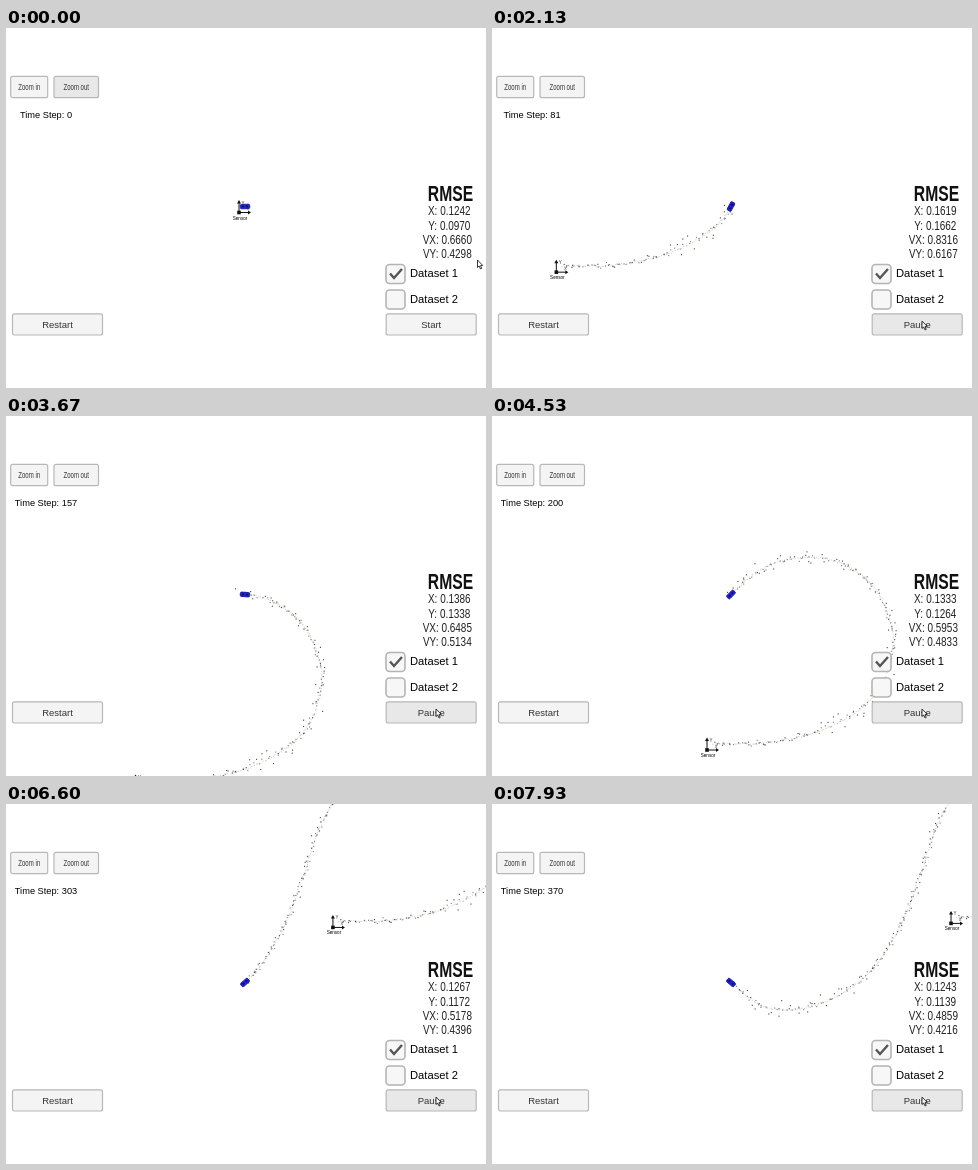
Write an HTML page with a canvas that moves like this. It is 480 px wide and 360 px high and loops after 8 s.

```html
<!DOCTYPE html>
<html>
<head>
<meta charset="utf-8">
<style>
  html, body { margin: 0; width: 100%; height: 100%; overflow: hidden; background: #fff; }
  canvas { display: block; }
</style>
</head>
<body>
<canvas id="stage" width="480" height="360"></canvas>
<script>
const ctx = document.getElementById('stage').getContext('2d');
const LOOP = 8000, FRAME = 1000 / 15, START = 520, STEPS_PER_MS = .0499;
const CAR = [239, 178.5];

// Car position relative to the sensor, one point every 25 time steps
const SPACING = 25;
const ROUTE = [
  [6, -6], [63.5, -8], [121, -22.5], [167.5, -54.5], [186, -107], [169, -160],
  [124.5, -190], [69, -187.3], [24, -155.5], [-10, -107], [-30, -51], [-50.5, 2.5],
  [-83, 50.5], [-130, 80], [-183.5, 84.5], [-229, 52]
];

// Each error settles towards a floor as a power of the step count
const ERRORS = [
  { name: 'X', idle: .1242, floor: .1138, gain: 3.894, power: 1 },
  { name: 'Y', idle: .0970, floor: .0993, gain: 5.417, power: 1 },
  { name: 'VX', idle: .6660, floor: .1819, gain: 5.847, power: .5 },
  { name: 'VY', idle: .4298, floor: .25, gain: 3.3, power: .5 }
];

// Catmull-Rom curve through the route
function position(step) {
  const last = ROUTE.length - 1;
  const i = Math.min(last - 1, Math.floor(step / SPACING)), u = step / SPACING - i;
  return [0, 1].map(k => {
    const b = ROUTE[i][k], c = ROUTE[i + 1][k];
    const a = i > 0 ? ROUTE[i - 1][k] : 2 * b - c;
    const d = i + 2 <= last ? ROUTE[i + 2][k] : 2 * c - b;
    return b + u / 2 * (c - a + u * (2 * a - 5 * b + 4 * c - d + u * (3 * (b - c) + d - a)));
  });
}

let seed = 7;
function random() {
  seed = (seed * 16807) % 2147483647;
  return seed / 2147483647;
}
const gauss = () => (random() + random() + random() + random() - 2) * 1.73;

// Alternating lidar (even noise) and radar (range and bearing noise) readings
const readings = Array.from({ length: 376 }, (_, n) => {
  const [x, y] = position(n);
  const estimate = [x + gauss() * .4, y + gauss() * .4];
  if (n % 2) return { color: '#857a74', estimate, at: [x + gauss() * 1.2, y + gauss() * 1.2] };
  const range = Math.hypot(x, y) + gauss() * 2.4, angle = Math.atan2(y, x) + gauss() * .026;
  return { color: '#40404c', estimate, at: [range * Math.cos(angle), range * Math.sin(angle)] };
});

function label(str, x, y, size, { align = 'center', color = '#333', weight = '', condense = 1 } = {}) {
  ctx.save();
  ctx.translate(x, y);
  ctx.scale(condense, 1);
  ctx.font = `${weight} ${size}px "Liberation Sans", Arial, sans-serif`;
  ctx.textAlign = align;
  ctx.fillStyle = color;
  ctx.fillText(str, 0, 0);
  ctx.restore();
}

function box(x, y, w, h, radius, fill, stroke, line = 1) {
  ctx.beginPath();
  ctx.roundRect(x, y, w, h, radius);
  ctx.fillStyle = fill;
  ctx.fill();
  ctx.strokeStyle = stroke;
  ctx.lineWidth = line;
  ctx.stroke();
}

function poly(points, fill, stroke, line) {
  ctx.beginPath();
  points.forEach(p => ctx.lineTo(...p));
  if (fill) {
    ctx.closePath();
    ctx.fillStyle = fill;
    ctx.fill();
  }
  if (stroke) {
    ctx.strokeStyle = stroke;
    ctx.lineWidth = line;
    ctx.stroke();
  }
}

function dot([x, y], size, color) {
  ctx.fillStyle = color;
  ctx.fillRect(x - size / 2, y - size / 2, size, size);
}

function button(str, x, y, w, h, lit, size, condense) {
  box(x, y, w, h, 2, lit ? '#e8e8e8' : '#f4f4f4', '#b8b8b8', 1.2);
  label(str, x + w / 2, y + h / 2 + size * .35, size, { condense });
}

function checkbox(str, y, checked) {
  box(380, y + 1, 19, 19, 3.5, '#f7f7f7', '#b4b4b4', 1.6);
  if (checked) poly([[384, y + 10], [388, y + 14.5], [396, y + 5.5]], null, '#555', 2.4);
  label(str, 404, y + 13.7, 11.2, { align: 'left', color: '#000' });
}

function drawSensor() {
  poly([[0, -11], [0, 0], [10, 0]], null, '#111', 1);
  poly([[-2, -9], [0, -12.5], [2, -9]], '#111');
  poly([[9, -2], [12, 0], [9, 2]], '#111');
  dot([0, 0], 3.6, '#111');
  label('Y', 4, -8, 4.5);
  label('X', 9, -2.5, 4);
  label('Sensor', 1, 7, 4.6, { color: '#000' });
}

function drawCar(step) {
  const [x0, y0] = position(Math.max(0, step - 1)), [x1, y1] = position(step + 1);
  ctx.save();
  ctx.translate(...CAR);
  ctx.rotate(Math.atan2(y1 - y0, x1 - x0));
  box(-4.7, -2.2, 9.4, 4.4, 1.2, '#2222d4', '#1414a4', .9);
  dot([-2, 0], 1.6, '#0a0a58');
  dot([2, 0], 1.8, '#0a0a58');
  ctx.restore();
}

function drawWorld(step) {
  const [x, y] = position(step);
  ctx.save();
  ctx.translate(CAR[0] - x, CAR[1] - y);
  for (const { color, estimate, at } of readings.slice(0, step)) {
    dot(estimate, 1, '#c4ccb8');
    dot(at, 1.1, color);
  }
  drawSensor();
  ctx.restore();
  drawCar(step);
}

function drawControls(t, step) {
  const running = step > 0;
  button('Zoom in', 4.7, 48.3, 37, 21.4, false, 8.6, .7);
  button('Zoom out', 48, 48.3, 44.5, 21.4, !running, 8.6, .7);
  button('Restart', 6.5, 285.8, 90, 21.2, false, 9.5);
  button(running ? 'Pause' : 'Start', 380.2, 285.8, 90, 21.2, t >= 260, 9.5);
  label('Time Step: ' + step, 40, 90.3, 9.25, { color: '#000' });

  label('RMSE', 444.5, 173, 21.5, { weight: 'bold', color: '#111', condense: .73 });
  ERRORS.forEach(({ name, idle, floor, gain, power }, i) => {
    const value = running ? floor + gain * step ** -power : idle;
    label(`${name}: ${value.toFixed(4)}`, name.length > 1 ? 441.3 : 443.3, 187.3 + 14.3 * i, 12,
      { color: '#222', condense: .83 });
  });
  checkbox('Dataset 1', 235.5, true);
  checkbox('Dataset 2', 261, false);
}

// The pointer swings up and over, then lands on the start button
function drawPointer(t) {
  const u = Math.min(1, t / 267);
  ctx.save();
  ctx.translate(471.5 - 41.5 * u * u, 232 + 61 * u - 138 * Math.sin(Math.PI * u) * (1 - u));
  poly([[0, 0], [0, 7.5], [1.7, 6], [3, 9], [4.2, 8.4], [3, 5.6], [5.2, 5.4], [0, 0]], '#fff', '#222', .9);
  ctx.restore();
}

function render(now) {
  const t = Math.floor((now % LOOP + 4) / FRAME) * FRAME;
  const step = Math.max(0, Math.round((t - START) * STEPS_PER_MS));
  ctx.fillStyle = '#fff';
  ctx.fillRect(0, 0, 480, 360);
  drawWorld(step);
  drawControls(t, step);
  drawPointer(t);
}

const begin = performance.now();
function tick() {
  render(performance.now() - begin);
  requestAnimationFrame(tick);
}
tick();
</script>
</body>
</html>
```
